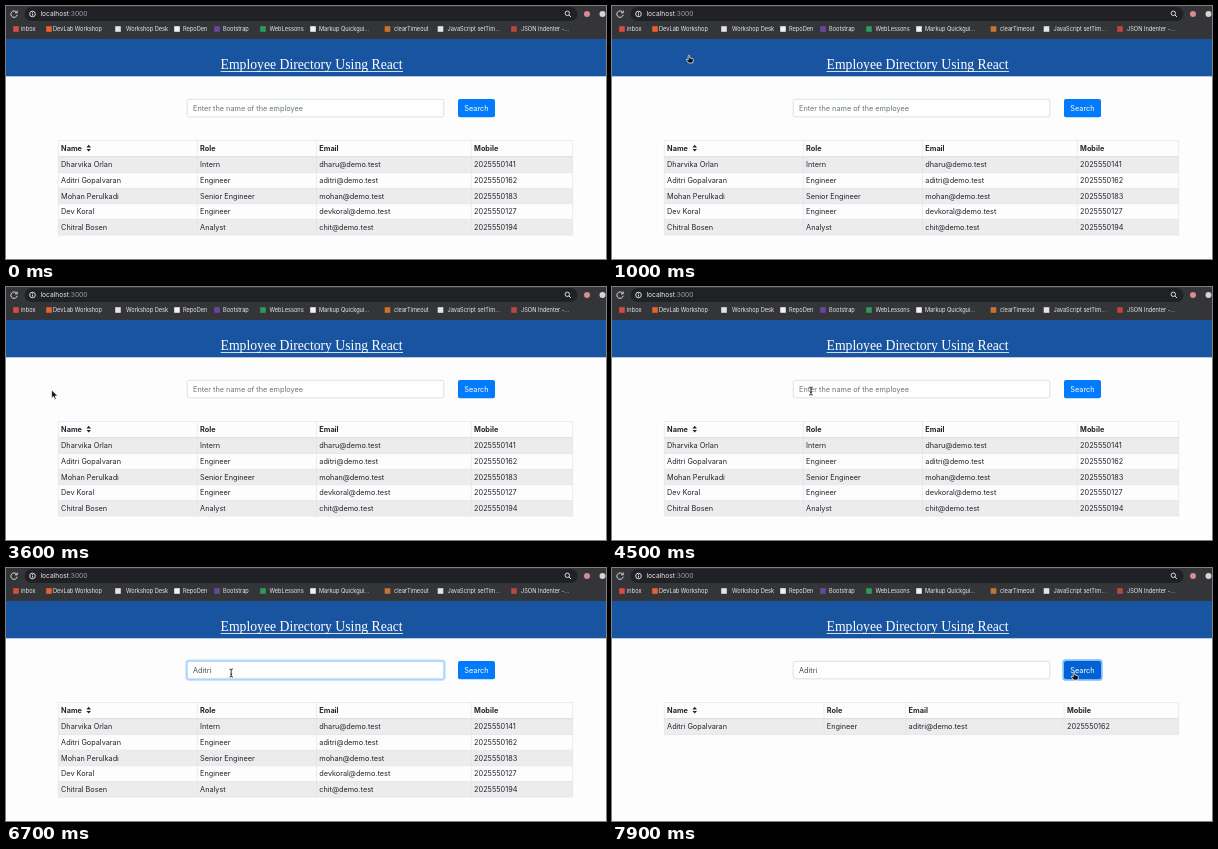
Write an HTML page that moves like this. It is 600x253 px and loops after 8000 ms.

```html
<!DOCTYPE html>
<html lang="en">
<head>
<meta charset="utf-8">
<title>Employee Directory</title>
<style>
  html, body { margin: 0; width: 100%; height: 100%; overflow: hidden; background: #fdfdfd; }
  svg { display: block; width: 600px; height: 253px; }
  text { font: 7.3px Inter, "Open Sans", sans-serif; fill: #212529; white-space: pre; }
  .bar text { font-size: 5.65px; fill: #e8eaed; }
  .bar .url { font-size: 6.65px; }
  .title { font: 13.7px "Liberation Serif", Times, serif; fill: #fff; }
  .th { font-weight: 700; }
  .line { fill: none; stroke: #dee2e6; stroke-width: .6; }
  .icon { fill: none; stroke: #dadce0; stroke-width: 1; }
  .pointer { fill: #111; stroke: #fff; stroke-width: .7; stroke-linejoin: round; }
</style>
</head>
<body>
<svg viewBox="0 0 600 253">
  <rect width="600" height="253" fill="#fdfdfd"/>
  <g class="bar">
    <rect width="600" height="33" fill="#343538"/>
    <rect x="18.5" y="1" width="553" height="14" rx="7" fill="#202124"/>
    <circle id="hover" cx="8" cy="8" r="7" fill="#5b5c60"/>
    <path id="reload" class="icon" d="M10.6 6.2A3.2 3.2 0 1 0 11.2 8.8M11.2 4.6V6.8H9"/>
    <path id="stop" class="icon" d="M5.5 5.5l5 5m0-5l-5 5"/>
    <g class="icon" stroke-width=".8">
      <circle cx="26.5" cy="8" r="2.8"/><path d="M26.5 7.6v2M26.5 6v.8"/>
      <circle cx="561.3" cy="7.3" r="2.2"/><path d="M563 9l2 2"/>
    </g>
    <circle cx="581" cy="8" r="3" fill="#d98a92"/>
    <circle cx="596.5" cy="8" r="3" fill="#d5d5d5"/>
    <text class="url" x="34.5" y="10.4">localhost<tspan fill="#9aa0a6">:3000</tspan></text>
    <g id="marks"></g>
  </g>
  <rect y="33" width="600" height="37.3" fill="#1854a0"/>
  <text class="title" x="214.6" y="63.2">Employee Directory Using React</text>
  <path d="M214.6 65.5H397" stroke="#fff" stroke-width=".8"/>

  <rect id="inputRing" x="180.2" y="92.3" width="258.6" height="19.6" rx="2.6" fill="none" stroke="#bfdeff" stroke-width="1.7"/>
  <rect id="input" x="181.2" y="93.3" width="256.6" height="17.6" rx="1.9" fill="#fff" stroke-width=".7"/>
  <text id="field" x="187" y="105"></text>
  <path id="caret" stroke="#222" stroke-width=".6"/>
  <rect id="buttonRing" x="451.2" y="92.2" width="38.6" height="19.8" rx="2.6" fill="none" stroke="#7fbdff" stroke-width="1.7"/>
  <rect id="button" x="452" y="93" width="37" height="18.2" rx="2"/>
  <text x="458.3" y="105" style="fill:#fff">Search</text>

  <g id="table"></g>
  <g id="cursor">
    <path id="arrow" class="pointer" d="M0 0V8.2L1.9 6.5 3.2 9.5 4.6 8.9 3.4 6H6Z"/>
    <path id="hand" class="pointer" d="M-.8 .6Q0 -.5 .7 .6V3L3.8 3.7Q4.6 4 4.4 5L3.7 8H-.3L-2.6 5Q-2.7 3.9-1.6 4.3L-.8 5Z"/>
    <path id="ibeam" d="M-1.8-4Q0-4 0-3Q0-4 1.8-4M0-3.2V3.2M-1.8 4Q0 4 0 3Q0 4 1.8 4M-1 1.2H1" fill="none" stroke="#222" stroke-width=".9"/>
  </g>
</svg>
<script>
const $ = id => document.getElementById(id);
const show = (id, on) => $(id).style.opacity = +on;

// Bookmarks: icon x, icon colour, label x, label
const bookmarks = [
  [10, '#d94b3f', 15, 'inbox'],
  [43, '#e8602c', 47, 'DevLab Workshop'],
  [112, '#e4e4e4', 120, 'Workshop Desk'],
  [171, '#f1f1f1', 177, 'RepoDen'],
  [211, '#69479b', 217, 'Bootstrap'],
  [257, '#2d9b59', 263.5, 'WebLessons'],
  [307, '#f1f1f1', 313, 'Markup Quickgui...'],
  [381.5, '#c8742f', 388, 'clearTimeout'],
  [434.5, '#e4e4e4', 441.5, 'JavaScript setTim...'],
  [508, '#b8473c', 515, 'JSON Indenter -...']
];
$('marks').innerHTML = bookmarks.map(([ix, color, x, label]) =>
  `<rect x="${ix - 2.8}" y="20.2" width="5.6" height="5.6" fill="${color}"/><text x="${x}" y="25">${label}</text>`).join('');

const people = [
  ['Dharvika Orlan', 'Intern', 'dharu@demo.test', '2025550141'],
  ['Aditri Gopalvaran', 'Engineer', 'aditri@demo.test', '2025550162'],
  ['Mohan Perulkadi', 'Senior Engineer', 'mohan@demo.test', '2025550183'],
  ['Dev Koral', 'Engineer', 'devkoral@demo.test', '2025550127'],
  ['Chitral Bosen', 'Analyst', 'chit@demo.test', '2025550194']
];
const TOP = 134.5, HEAD = 16.4, ROW = 15.65;

function tableMarkup(rows, cols) {
  const bottom = TOP + HEAD + rows.length * ROW;
  const cells = (items, y, cls) => items.map((s, i) =>
    `<text class="${cls}" x="${cols[i] + 2.8}" y="${y}">${s}</text>`).join('');
  let out = cells(['Name', 'Role', 'Email', 'Mobile'], 145, 'th') +
    '<path d="M80.4 141.5l2.3-2.7 2.3 2.7zm0 1.4l2.3 2.7 2.3-2.7z" fill="#212529"/>';
  rows.forEach((row, i) => {
    const y = TOP + HEAD + i * ROW;
    if (i % 2 == 0) out += `<rect x="52.3" y="${y}" width="514.4" height="${ROW}" fill="#ececec"/>`;
    out += cells(row, y + 10.3, '') + `<path class="line" d="M52.3 ${y}H566.7"/>`;
  });
  return out + `<path class="line" d="M52.3 ${TOP + HEAD - .3}H566.7" style="stroke-width:1.1"/>` +
    `<path class="line" d="M52.3 ${TOP}H566.7V${bottom}H52.3Z${cols.slice(1).map(x => `M${x} ${TOP}V${bottom}`).join('')}"/>`;
}
const fullTable = tableMarkup(people, [52.3, 191.3, 310.5, 465.3]);
const foundTable = tableMarkup([people[1]], [52.3, 212, 293.8, 452.2]);

const keyTimes = [5500, 5800, 6000, 6300, 6400, 6500];
// Pointer path: time, x, y
const path = [
  [900, 84, 176], [1000, 77, 49], [1100, 45, 28], [1300, 12, 11], [1700, 5, 7], [2800, 5, 7],
  [3100, 16, 40], [3700, 48, 108], [4100, 186, 108], [4400, 199, 104], [6600, 199, 104],
  [6900, 300, 108], [7200, 455, 106], [7300, 462, 104], [8000, 462, 104]
];

function pointerAt(t) {
  const i = path.findIndex(p => p[0] > t);
  if (i < 1) return path[0].slice(1);
  const [t0, x0, y0] = path[i - 1], [t1, x1, y1] = path[i];
  const k = (t - t0) / (t1 - t0), e = k * k * (3 - 2 * k);
  return [x0 + (x1 - x0) * e, y0 + (y1 - y0) * e];
}

let lastTable;
function draw(now) {
  const t = Math.floor(now % 8000 / 100) * 100;
  const typed = 'Aditri'.slice(0, keyTimes.filter(k => t >= k).length);
  const focus = t < 4800 || t >= 7500 ? 0 : t < 4900 ? .5 : 1;
  const stopping = t >= 1800 && t < 2100;

  show('hover', t >= 1300 && t < 3000);
  show('reload', !stopping);
  show('stop', stopping);

  const field = $('field');
  field.textContent = typed || 'Enter the name of the employee';
  field.style.fill = typed ? '#495057' : '#6c757d';
  const caretX = 187.4 + (typed ? field.getComputedTextLength() : 0);
  $('caret').setAttribute('d', `M${caretX} 98V106.5`);
  show('caret', t >= 4900 && t < 6700);
  $('inputRing').style.opacity = focus;
  $('input').style.stroke = focus ? '#80bdff' : '#ced4da';

  const [x, y] = pointerAt(t);
  const overButton = x > 452 && t > 7000;
  const overInput = !overButton && x > 181 && x < 438 && y > 93 && y < 111;
  $('button').style.fill = overButton ? '#0062d2' : '#007bff';
  $('buttonRing').style.opacity = t < 7500 ? 0 : t < 7600 ? .5 : 1;

  $('cursor').setAttribute('transform', `translate(${x} ${y})`);
  show('cursor', t >= 900 && (t < 5500 || t >= 6700));
  const hand = t < 1100 || overButton;
  show('hand', hand);
  show('ibeam', overInput);
  show('arrow', !hand && !overInput);

  const table = t < 7500 ? fullTable : foundTable;
  if (table != lastTable) $('table').innerHTML = lastTable = table;
}

function loop() {
  draw(performance.now());
  requestAnimationFrame(loop);
}
loop();
</script>
</body>
</html>
```
